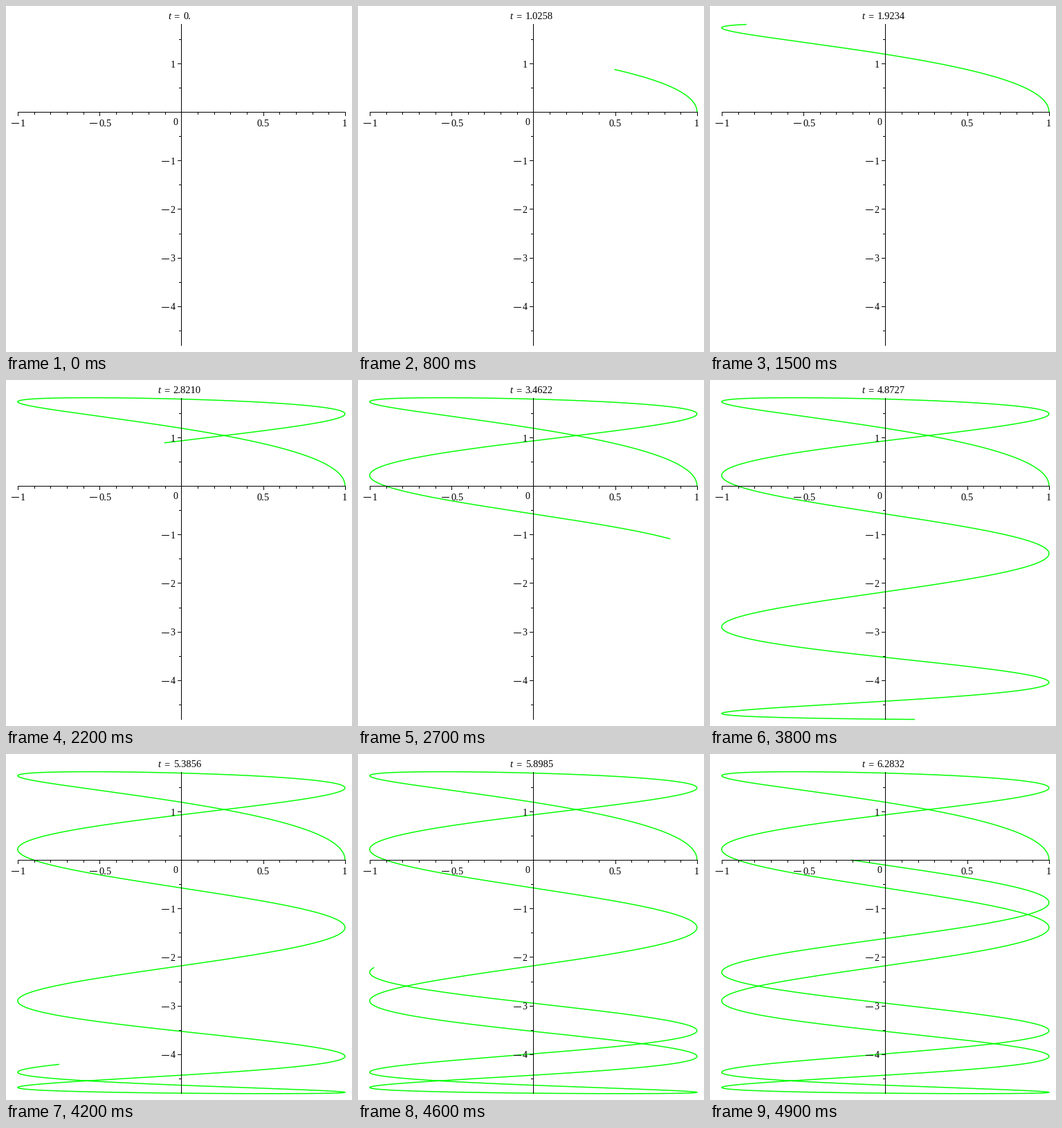
Recreate the animation shown at these times as a matplotlib script. Size 500 by 500 pixels, loop 5000 ms.

```python
import numpy as np
import matplotlib.pyplot as plt
from matplotlib.animation import FuncAnimation

DPI = 100
SIZE = 500
FRAMES = 50
PX = 72 / DPI                      # one pixel in points
X0, Y0 = 253.4, 153.2              # origin of the plot on the stage
SX, SY = 236.5, 70.12              # pixels per unit
GREEN = "#00ff00"

plt.rcParams["font.family"] = "Liberation Serif"
fig = plt.figure(figsize=(SIZE / DPI, SIZE / DPI), dpi=DPI, facecolor="white")
ax = fig.add_axes([0, 0, 1, 1])
ax.set(xlim=(0, SIZE), ylim=(SIZE, 0))
ax.axis("off")


def curve(t):
    """Stage position of the point (cos t^2, t sin t)."""
    return X0 + SX * np.cos(t**2), Y0 - SY * t * np.sin(t)


def segment(x1, y1, x2, y2):
    """Crisp one-pixel line that includes both end pixels."""
    ax.plot([x1, x2], [y1, y2], color="black", lw=PX, zorder=3,
            solid_capstyle="projecting", snap=True)


def text(x, y, s, size=14, ha="center", **style):
    return ax.text(x, y, s, fontsize=size * PX, ha=ha, va="baseline",
                   zorder=4, **style)


def minus(x, y):
    segment(x, y, x + 10, y)


# horizontal axis
segment(17, Y0, 490, Y0)
for i in range(-10, 11):
    x = X0 + SX * i / 10
    segment(x, Y0, x, Y0 + (5 if i % 5 == 0 else 3))
text(371.5, 174, "0.5", 14.5)
text(489.5, 174, "1")
text(144, 174, "0.5", 14.5)
minus(121, 169)
text(24.5, 174, "1")
minus(8, 169)
text(245, 172, "0")

# vertical axis
segment(X0, 26, X0, 490)
for i in range(-9, 4):
    y = Y0 - SY * i / 2
    major = i % 2 == 0
    if i:
        segment(X0 - (5 if major else 3), y, X0, y)
    if i and major:
        text(241, y + 5.6, str(abs(i // 2)))
        if i < 0:
            minus(225, y + 1)

trace, = ax.plot([], [], color=GREEN, lw=1.5 * PX, zorder=2,
                 solid_capstyle="butt", solid_joinstyle="round")
name = text(0, 19, "t", 14.5, "left", style="italic")
equals = text(0, 19, "=", 14.5, "left")
value = text(0, 19, "", 14.5, "left")


def label(t):
    if t == 0:
        return "0."
    return f"{t:.5f}" if t < 1 else f"{t:.4f}"


def draw(k):
    end = 2 * np.pi * k / (FRAMES - 1)
    trace.set_data(*curve(np.linspace(0, end, 2 + 30 * k)))
    number = label(end)
    width = 22 + 7.25 * (len(number) - 1) + 3.6
    left = 250.5 - width / 2
    name.set_x(left)
    equals.set_x(left + 8.5)
    value.set_x(left + 22)
    value.set_text(number)
    return trace, name, equals, value


anim = FuncAnimation(fig, draw, frames=FRAMES, interval=100,
                     repeat=True, repeat_delay=0)
plt.show()
```
